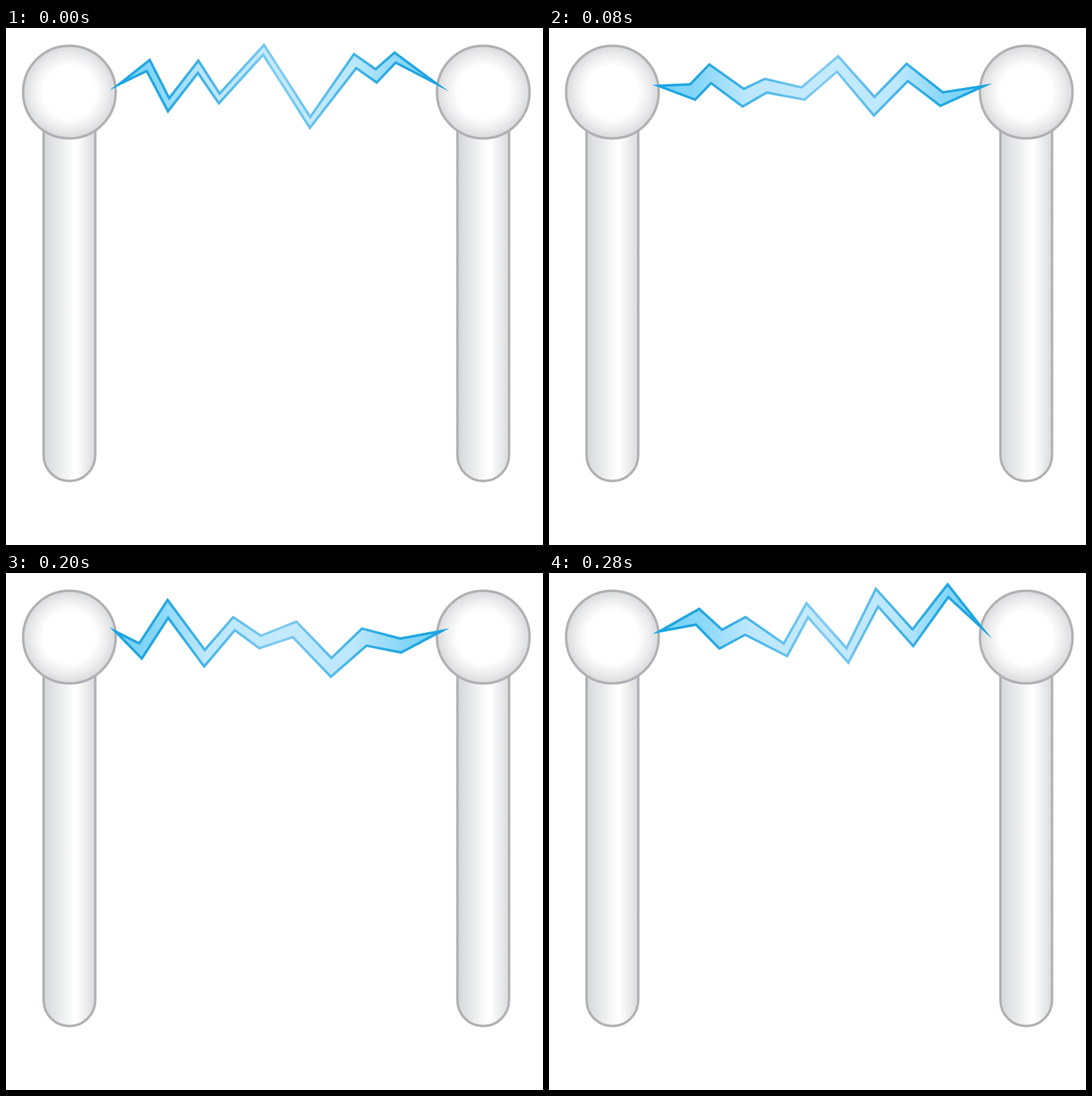
An HTML page with a canvas that plays this animation: 763 by 734 pixels, repeating every 320 ms.

```html
<!DOCTYPE html>
<html lang="en">
<head>
<meta charset="utf-8">
<title>Electric arc</title>
<style>
  html, body { margin: 0; width: 100%; height: 100%; overflow: hidden; background: #fff; }
  canvas { display: block; }
</style>
</head>
<body>
<canvas id="stage" width="763" height="734"></canvas>
<script>
const ctx = document.getElementById('stage').getContext('2d');
const STEP_MS = 40;
const LINE = 3.5;
const LEFT = 147, RIGHT = 630;
const POLES = [90.1, 678.1];

// A bolt is described by the bends of its centre line. Its tips lean away from the outer bends.
function spine(bends) {
  const points = bends.split(' ').map(pair => pair.split(',').map(Number));
  const tip = (x, [, y]) => [x, 99 - 0.2 * y];
  return [tip(LEFT, points[0]), ...points, tip(RIGHT, points.at(-1))];
}

const between = (a, b) => a.map(([x, y], i) => [(x + b[i][0]) / 2, (y + b[i][1]) / 2]);

function direction([x1, y1], [x2, y2]) {
  const length = Math.hypot(x2 - x1, y2 - y1);
  return [(x2 - x1) / length, (y2 - y1) / length];
}

// Gives the centre line body: each bend is widened along its bisector, more so where it is sharp.
function outline(points, weight = 1) {
  const top = [], bottom = [];
  for (let i = 1; i < points.length - 1; i++) {
    const [x, y] = points[i];
    const [inX, inY] = direction(points[i - 1], points[i]);
    const [outX, outY] = direction(points[i], points[i + 1]);
    const [tx, ty] = direction([0, 0], [inX + outX, inY + outY]);
    const swell = 26.5 + 5 * Math.cos((i - 2.2) * Math.PI * 0.4);
    const miter = 15 / (tx * inX + ty * inY);
    const half = weight * Math.max(swell, miter) / 2;
    top.push([x + ty * half, y - tx * half]);
    bottom.unshift([x - ty * half, y + tx * half]);
  }
  return [points[0], ...top, points.at(-1), ...bottom];
}

const tall = spine('202,53 231,109 273,55 303,100 366,31 432,134 496,47 526,68 553,42');
const low = spine('190,66 222,94 260,55 317,108 343,81 414,119 459,80 497,121 561,89');
const flat = spine('204,91 229,65 276,99 308,82 361,93 410,51 462,111 509,63 558,101');
const sharp = spine('205,127 238,41 276,133 300,36 361,92 415,23 473,150 499,40 558,132');
const falling = spine('191,111 230,51 282,121 324,72 361,98 410,80 462,134 509,91 561,103');
const rising = spine('211,62 244,94 279,75 336,109 367,53 424,117 466,35 517,92 567,25');

const bolts = [
  outline(tall, 0.8), outline(low), outline(flat), outline(between(flat, sharp)),
  outline(sharp), outline(falling), outline(between(rising, tall)), outline(rising),
];

// Spreads the colours over the gradient at the given offsets.
function shade(gradient, stops) {
  for (const [offset, color] of Object.entries(stops)) gradient.addColorStop(offset, color);
  return gradient;
}

const boltFill = shade(ctx.createLinearGradient(LEFT, 0, RIGHT, 0), {
  0: '#6dcff6', 0.13: '#85d6f8', 0.28: '#bce7fd', 0.5: '#c5eafd',
  0.72: '#bce7fd', 0.87: '#85d6f8', 1: '#6dcff6' });
const boltStroke = shade(ctx.createLinearGradient(LEFT, 0, RIGHT, 0), {
  0: '#1ba4e1', 0.17: '#25a8e2', 0.5: '#82ccf3', 0.83: '#25a8e2', 1: '#1ba4e1' });
const poleFill = shade(ctx.createLinearGradient(-37, 0, 37, 0), {
  0: '#d6d7da', 0.3: '#e9eaea', 0.6: '#fff', 0.64: '#fff', 1: '#d8d9db' });
const ballFill = shade(ctx.createRadialGradient(0, 91, 0, 0, 91, 66), {
  0: '#fff', 0.56: '#fff', 0.8: '#ededee', 1: '#d8d9db' });

function paint(fill, stroke, lineWidth) {
  Object.assign(ctx, { fillStyle: fill, strokeStyle: stroke, lineWidth });
  ctx.fill();
  ctx.stroke();
}

function drawPole(x) {
  ctx.save();
  ctx.translate(x, 0);
  ctx.beginPath();
  ctx.roundRect(-36.7, 91, 73.4, 552.2, [0, 0, 36.7, 36.7]);
  paint(poleFill, '#b1b1b5', LINE);
  ctx.beginPath();
  ctx.arc(0, 91, 65.8, 0, Math.PI * 2);
  paint(ballFill, '#b1b1b5', LINE);
  ctx.restore();
}

function drawBolt(points) {
  ctx.save();
  ctx.beginPath();
  for (const [x, y] of points) ctx.lineTo(x, y);
  ctx.closePath();
  ctx.clip(); // keeps the border inside the outline
  paint(boltFill, boltStroke, LINE * 2);
  ctx.restore();
}

function draw(now) {
  ctx.clearRect(0, 0, 763, 734);
  POLES.forEach(drawPole);
  drawBolt(bolts[Math.floor(now / STEP_MS) % bolts.length]);
}

let start;
function tick(now) {
  start ??= now;
  draw(now - start);
  requestAnimationFrame(tick);
}
draw(0);
requestAnimationFrame(tick);
</script>
</body>
</html>
```
